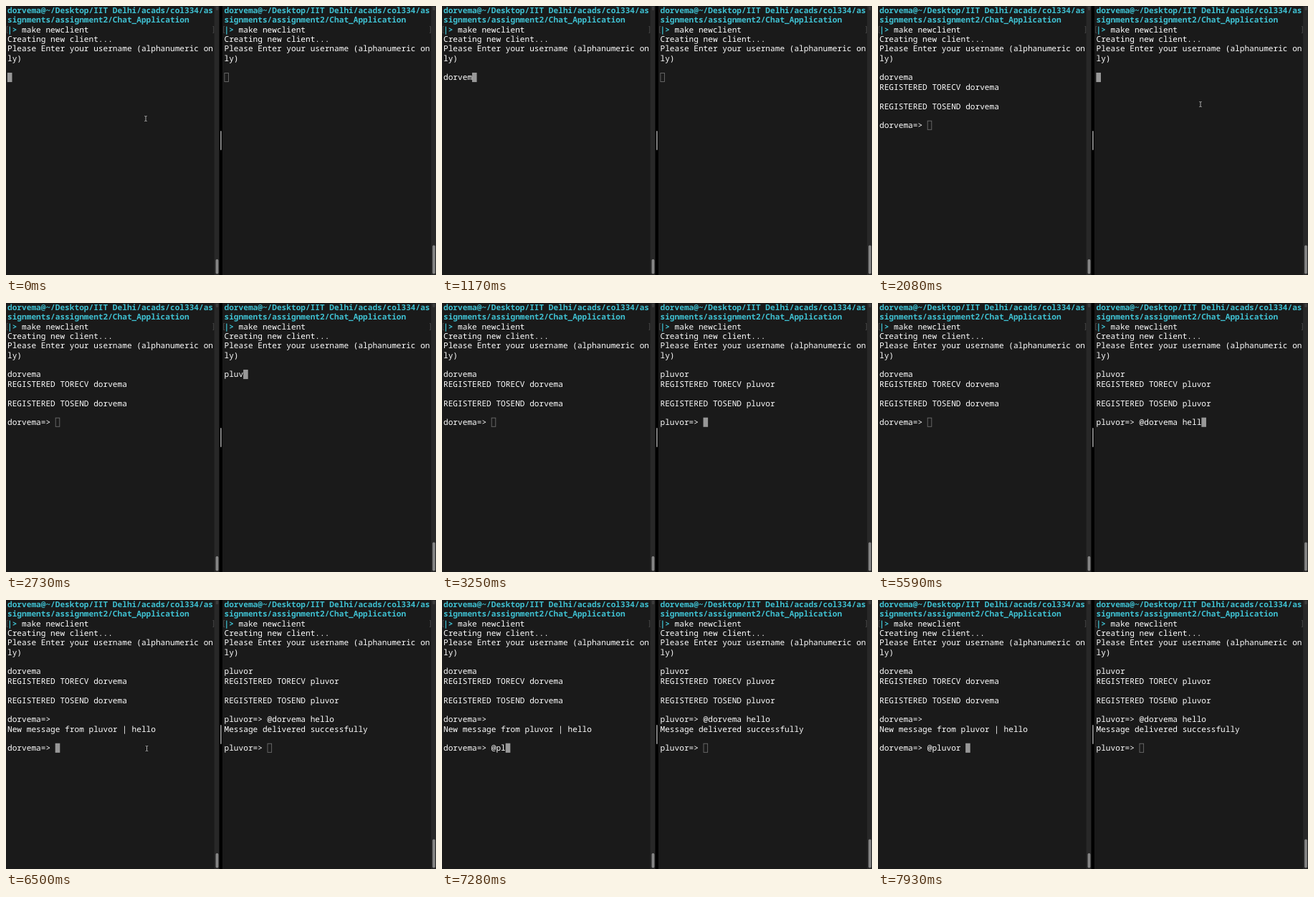
Animation of 600x375 px, one loop 8000 ms. Source, as an HTML page:

```html
<!DOCTYPE html>
<html lang="en">
<head>
<meta charset="utf-8">
<title>Terminal chat</title>
<style>
  html, body { margin: 0; width: 100%; height: 100%; overflow: hidden; background: #000; }
  svg { display: block; width: 600px; height: 375px; }
  text {
    font: 500 11.13px "Noto Sans Mono", "DejaVu Sans Mono", monospace;
    fill: #fff; white-space: pre; text-rendering: geometricPrecision;
  }
  .path { fill: #3fc1d2; font-weight: 700; }
</style>
</head>
<body>
<svg id="stage" viewBox="0 0 600 375"></svg>
<script>
const LOOP = 8000, STEP = 130;
const COL = 6.68, ROW = 13.35, TOP = -0.9, BASE = 10.9;
const LEFT_USER = 'dorvema', RIGHT_USER = 'pluvor';
const stage = document.getElementById('stage');

function setAll(el, attrs) {
  for (const key in attrs) el.setAttribute(key, attrs[key]);
}
function add(parent, tag, attrs, content = '') {
  const el = document.createElementNS('http://www.w3.org/2000/svg', tag);
  setAll(el, attrs);
  el.textContent = content;
  parent.append(el);
  return el;
}
const rect = (x, y, width, height, fill, rx = 0) =>
  add(stage, 'rect', { x, y, width, height, fill, rx });

function makePane(x, thumbY) {
  rect(x - 2.5, 0, 293.5, 375, '#1a1a1a');
  rect(x + 288.7, 0, 7, 375, '#282828');
  rect(x + 290.8, 1, 3.5, 5, '#3c3c3c', 1);
  rect(x + 290.6, thumbY, 3.8, 373.5 - thumbY, '#858585', 1.8);
  const brackets = `M${x + 0.8} 28.5h-1.6v9h1.6M${x + 286.6} 28.5h1.2v9h-1.2`;
  add(stage, 'path', { d: brackets, stroke: '#555', fill: 'none', 'stroke-width': 0.8 });

  const lines = Array.from({ length: 16 }, (_, row) =>
    add(stage, 'text', { x, y: TOP + row * ROW + BASE, class: row < 2 ? 'path' : '' }));
  const command = add(stage, 'text', { x, y: TOP + 2 * ROW + BASE });
  add(command, 'tspan', { class: 'path' }, '|>');
  add(command, 'tspan', {}, ' make newclient');
  const caret = add(stage, 'rect', { 'stroke-width': 0.9 });

  return function show(rows, focused) {
    lines.forEach((line, i) => { line.textContent = rows[i] || ''; });
    const last = rows.length - 1, inset = focused ? 0 : 0.5;
    setAll(caret, {
      x: x + rows[last].length * COL + inset - 0.1,
      y: TOP + last * ROW + 0.4 + inset,
      width: 6.6 - 2 * inset,
      height: 13.1 - 2 * inset,
      fill: focused ? '#989898' : 'none',
      stroke: focused ? 'none' : '#6c6c6c'
    });
  };
}

const showLeft = makePane(2, 353);
const showRight = makePane(304.5, 333.5);
rect(297.7, 0, 4.3, 375, '#000');
rect(299, 174, 1.8, 27, '#8c8c8c', 0.9);

const pointer = add(stage, 'g', { fill: 'none' });
for (const [stroke, width] of [['#111', 2], ['#c4c4c4', 0.9]]) {
  add(pointer, 'path', {
    d: 'M-1.7-3.6Q0-3.6 0-2.6Q0-3.6 1.7-3.6M0-2.6V2.6M-1.7 3.6Q0 3.6 0 2.6Q0 3.6 1.7 3.6',
    stroke, 'stroke-width': width
  });
}

// The pointer glides during [start, arrive], rests, then hides
const glides = [
  { start: 0, arrive: 0, hide: 650, from: [195, 157], to: [195, 157] },
  { start: 1820, arrive: 2080, hide: 2470, from: [240, 152], to: [450, 137] },
  { start: 3640, arrive: 3640, hide: 4160, from: [444, 151.5], to: [444, 151.5] },
  { start: 5980, arrive: 6500, hide: 6760, from: [444, 153], to: [196.5, 207] }
];

const progress = (t, start, end) =>
  end > start ? Math.min(1, Math.max(0, (t - start) / (end - start))) : 1;
const lerp = (a, b, p) => a + (b - a) * p;

// Text typed at an even pace, beginning with `first` characters
function type(text, t, start, end = start, first = 1) {
  if (t < start) return '';
  return text.slice(0, Math.round(lerp(first, text.length, progress(t, start, end))));
}

function session(user, name, registered) {
  const rows = [
    LEFT_USER + '@~/Desktop/IIT Delhi/acads/col334/as',
    'signments/assignment2/Chat_Application', '',
    'Creating new client...',
    'Please Enter your username (alphanumeric on', 'ly)', '', name
  ];
  if (registered) {
    rows.push('REGISTERED TORECV ' + user, '', 'REGISTERED TOSEND ' + user, '', user + '=> ');
  }
  return rows;
}

function drawPointer(t) {
  const glide = glides.find(g => t >= g.start && t < g.hide);
  pointer.setAttribute('visibility', glide ? 'visible' : 'hidden');
  if (!glide) return;
  const eased = progress(t, glide.start, glide.arrive) ** 3;
  const [x, y] = glide.from.map((v, i) => lerp(v, glide.to[i], eased));
  pointer.setAttribute('transform', `translate(${x} ${y})`);
}

function draw(time) {
  const t = Math.floor(time / STEP) * STEP;
  const left = session(LEFT_USER, type(LEFT_USER, t, 650, 1300, 2), t >= 1560);
  const right = session(RIGHT_USER, type(RIGHT_USER, t, 2470, 2990), t >= 3250);

  if (t >= 3250) {
    right[12] += type('@', t, 4160) + type(LEFT_USER, t, 4420, 4940, 2) +
      type(' ', t, 5200) + type('hello', t, 5460, 5720, 2);
  }
  if (t >= 5850) {
    const reply = type('@', t, 6760) + type(RIGHT_USER, t, 7150, 7670) + type(' ', t, 7930);
    left.push(`New message from ${RIGHT_USER} | hello`, '', LEFT_USER + '=> ' + reply);
    right.push('Message delivered successfully', '', RIGHT_USER + '=> ');
  }

  const rightFocus = t >= 2080 && t < 6500;
  showLeft(left, !rightFocus);
  showRight(right, rightFocus);
  drawPointer(t);
}

const begin = performance.now();
function tick() {
  draw((performance.now() - begin) % LOOP);
  requestAnimationFrame(tick);
}
tick();
</script>
</body>
</html>
```
